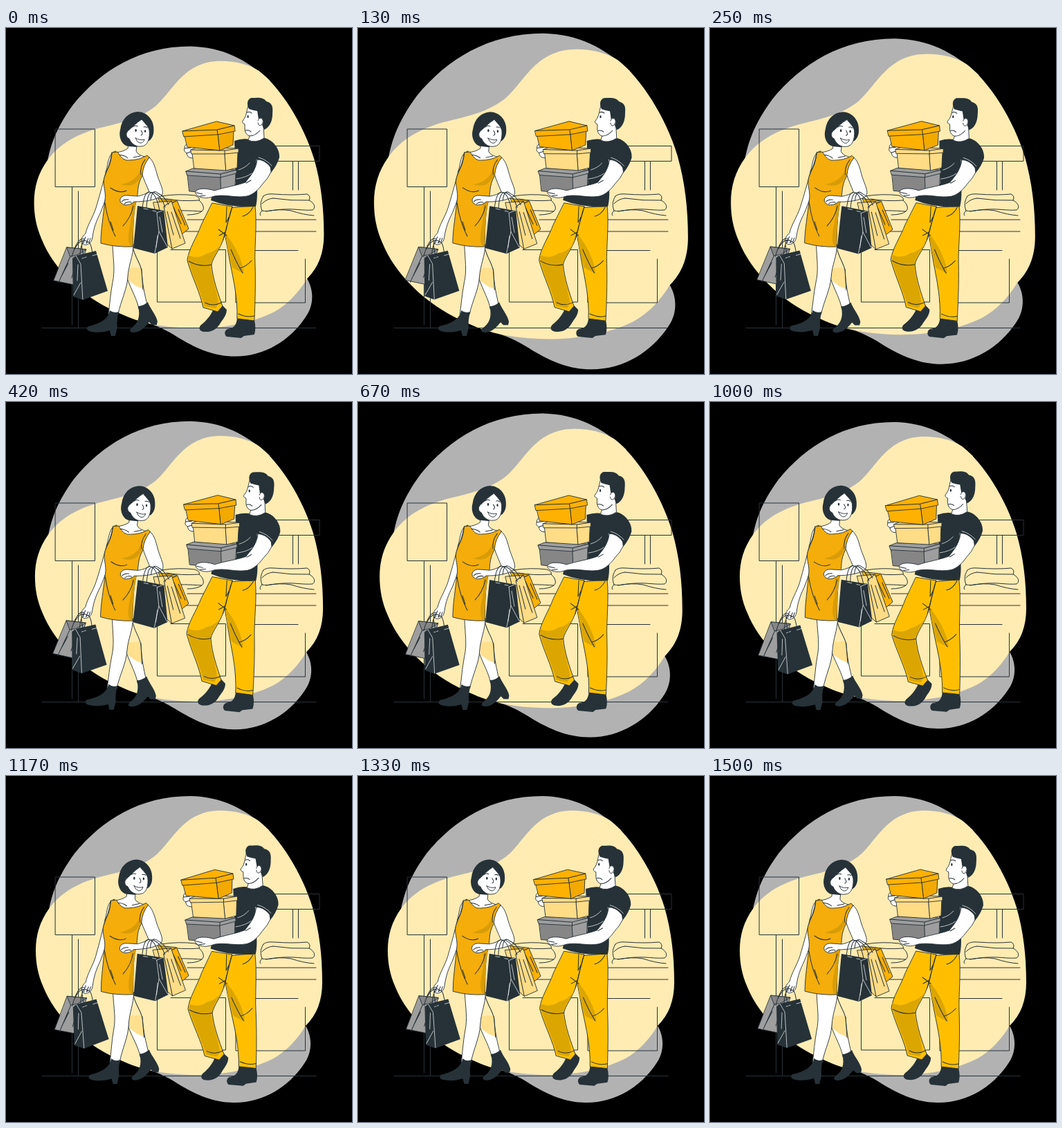
Animation, 500 px wide and 500 px high, one loop 1.54 s. Source, as an HTML page:

```html
<!DOCTYPE html>
<html lang="en">
<head>
<meta charset="utf-8">
<title>Shopping couple</title>
<style>
html, body { margin: 0; width: 100%; height: 100%; overflow: hidden; background: #000; }
svg { display: block; width: 100vw; height: 100vh; }
path { stroke-linejoin: round; stroke-linecap: round; }
.line { fill: none; stroke: #263238; stroke-width: 1; }
.pale { fill: none; stroke: #fff; stroke-width: .7; }
.skin, .dress, .gold, .cream, .grey, .box, .darkgrey, .amber { stroke: #263238; stroke-width: .9; }
.skin { fill: #fff; }
.dress { fill: #f4ad0a; }
.fold { fill: #d99c08; }
.box { fill: #ffb102; }
.gold { fill: #ffbf00; }
.amber { fill: #f2a900; }
.cream { fill: #ffdc86; }
.grey { fill: #9e9e9e; }
.darkgrey { fill: #868686; }
.ink { fill: #263238; }
.shade { fill: #dca600; }
</style>
</head>
<body>
<svg viewBox="0 0 500 500">
  <g id="blob">
    <path fill="#b2b2b2" d="M62 194C66 172 74 146 99 112C139 63 194 29 266 29C312 30 345 47 380 78L433 361C443 378 443 400 430 417C409 448 373 472 330 472C300 472 276 461 252 447C238 438 226 431 205 424Z"/>
    <path fill="#ffecb3" d="M310 50C331 50 350 55 364 64C395 88 428 140 443 190C453 225 457 260 457 298C457 325 449 345 433 361C420 382 405 398 385 409C350 426 310 432 274 432C220 431 190 423 160 408C110 386 70 345 54 305C46 287 43 270 43 252C43 230 49 210 62 192C78 170 100 156 135 146C168 138 195 132 217 114C242 92 257 50 310 50Z"/>
  </g>

  <g class="line">
    <path d="M71.500 146H128.500V229.500H71.500ZM95.500 229.500V429M104.500 236V433M52 433.500H448"/>
    <path d="M380 170.500H453V192.500H380M414.500 192.500V234M422.500 192.500V234"/>
    <path d="M372 243Q376 239 387 240Q415 242 435 240Q441 243 438 249C446 253 448 260 443 263C428 264 418 261 402 262C389 262 379 266 370 264C367 256 368 249 372 243ZM386 246Q412 250 438 249M370 254Q376 247 386 246M370 264Q365 269 368 271M376 265Q395 261 412 264Q430 270 445 271"/>
    <path d="M224 243Q250 239 273 242Q281 245 279 249C286 255 287 262 283 265C266 264 250 263 230 265M232 247Q254 251 279 249M283 265Q277 270 262 270"/>
    <path d="M262 277H448M258 294H448M238 320.500H317.500V396H218.500V320M360 321.500H422M432.500 334V397H332V330"/>
  </g>

  <g id="woman">
    <!-- back leg -->
    <path class="skin" d="M176 350L196 348C197 372 201 386 204 400L192 406C190 393 181 378 176 364Z"/>
    <path fill="#ffecb3" d="M170 316H183C188 333 195 343 196 350H174Z"/>
    <path fill="#ffe08f" d="M176 347L195 346L198 377L188 373L177 365Z"/>
    <path class="line" d="M183 316C187 333 195 341 196 351L198 378"/>
    <path class="ink" d="M191 402Q198 402 205 396C208 405 217 414 219 424L218 429L211 429L207 425C202 431 196 439 185 440C179 440 177 437 182 433C190 427 195 418 191 402Z"/>
    <!-- front leg -->
    <path class="skin" d="M154 313C155 337 158 350 154 368C151 384 150 400 148 414H162C166 394 175 378 176 360C177 342 184 330 184 313Z"/>
    <path class="ink" d="M150 408Q156 413 163 410C161 418 160 425 161 433L158 445H152L150 437C143 439 134 441 124 439C117 438 115 434 119 431C133 428 148 422 150 408Z"/>
    <!-- hanging grey bag -->
    <path class="grey" d="M88 317L116 320L98 371L69 365Z"/>
    <path class="darkgrey" d="M88 317L116 320L103 328L93 330Z"/>
    <path class="line" d="M93 330L76 368M90 340L79 361M104 333L95 361"/>
    <!-- far arm -->
    <path class="skin" d="M158 178C150 180 148 190 146 201C141 221 136 240 130 260C125 275 118 284 115 297Q108 303 109 309Q112 315 117 313Q124 311 125 302C127 288 131 278 136 268C143 251 148 235 150 221Z"/>
    <path class="line" d="M112 309L115 302M116 311L119 304M120 310L122 304M95 331Q103 302 113 305M99 320Q108 302 118 309"/>
    <path class="ink" d="M96 333L101 329L130 322L147 380L111 393L97 388Z"/>
    <path class="pale" d="M101 329L108 341L111 392M98 386L108 368M104 342L103 365M110 333L116 331M125 329L132 327"/>
    <path class="line" d="M113 332Q106 307 113 308M125 326Q122 304 116 311M107 328Q108 311 113 310"/>
    <!-- neck and chest -->
    <path class="skin" d="M178 160L176 174Q169 179 158 180L166 192L188 195L204 187Q190 184 188 178L189 169Z"/>
    <path class="line" d="M162 183Q172 184 176 188M184 187L194 185"/>
    <!-- dress -->
    <path class="dress" d="M153 180L161 179Q169 193 178 191Q192 191 204 184L207 187C201 198 199 204 197 213C188 229 192 239 188 250C183 271 184 294 183 316Q158 317 137 311C137 292 141 270 143 249C145 236 139 227 142 216C147 204 151 193 153 180Z"/>
    <path class="fold" d="M202 191C196 200 195 208 195 214C189 227 180 230 166 226Q186 222 192 209ZM188 251L167 249L180 254C186 276 171 300 180 315H183C184 292 184 270 188 251Z"/>
    <path class="line" d="M153 181Q151 199 144 208M201 190Q193 200 195 212M151 231Q164 240 174 235M143 253Q147 280 158 301M151 280L155 292M184 257Q180 275 169 286"/>
    <!-- bags on forearm -->
    <path class="box" d="M220 246L247 249L264 290L253 299L238 284Z"/>
    <path class="fold" d="M222 247L246 249.500L235 255Z"/>
    <path class="line" d="M235 255L253 298M235 255L246 250M242 259L253 283M249 262L259 285"/>
    <path class="cream" d="M213 252L239 250L259 311L240 319L226 306Z"/>
    <path class="line" d="M228 258L240 319M228 258L239 250M233 265L242 299M239 266L252 304"/>
    <path class="ink" d="M190 257L223 263L228 263L234 317L215 326L184 318Z"/>
    <path class="pale" d="M218 267L228 263M218 267L221 294L215 325M221 294L233 316M222 273L226 295M199 261L205 262M212 264L217 265M219 300L217 317"/>
    <!-- near arm -->
    <path class="skin" d="M207 187C214 193 216 204 219 214C223 226 229 236 225 242C217 249 199 251 185 251C180 256 171 257 168 254Q164 252 165 247Q168 241 176 242L190 243C197 242 203 239 207 237C203 227 199 219 197 212Q198 198 207 187Z"/>
    <path class="line" d="M167 251Q171 247 177 248M171 254Q176 250 181 252M197 261Q200 232 210 238Q218 242 222 264M203 260Q204 234 214 238Q225 243 230 259M209 249Q211 231 220 239Q229 243 235 255"/>
    <!-- head -->
    <path class="ink" d="M178 171C168 171 162 158 165 147C167 131 177 122 190 121C203 121 212 132 213 142C214 151 213 157 208 162L188 172Z"/>
    <path class="skin" d="M178 147C183 143 188 137 196 132C200 137 206 142 207 148C208 159 205 171 195 171C187 172 181 167 178 160Q173 158 174 152Q176 148 178 147Z"/>
    <g class="ink"><ellipse cx="187.500" cy="148" rx="1.300" ry="2"/><ellipse cx="201" cy="149" rx="1.200" ry="1.900"/><circle cx="176" cy="161" r="1.200"/></g>
    <path class="line" d="M183 143Q186 140 190 142M199 143Q202 142 204 144M195 148Q199 154 195 155"/>
    <path class="skin" d="M187 159Q194 163 200 161Q198 167 193 166Q189 165 187 159Z"/>
  </g>

  <g id="man">
    <!-- shoes -->
    <path class="ink" d="M312 400L319 407C319 416 313 421 309 428C304 436 296 440 286 439C279 438 278 433 282 429C290 423 296 415 299 408Z"/>
    <path class="ink" d="M334 420L359 422C361 430 361 437 359 443L344 445L340 448L319 446C315 443 316 437 320 435C328 434 333 431 334 420Z"/>
    <!-- trousers -->
    <path class="gold" d="M318 260L360 257C363 285 359 315 360 340C361 370 360 399 359 423L334 420C335 391 329 365 324 340L316 296Z"/>
    <path class="shade" d="M317 297C330 313 342 334 344 355C336 351 330 348 327 346L320 318Z"/>
    <path class="gold" d="M298 253L327 258C321 274 320 286 316 300C310 320 299 331 297 342C299 363 306 382 313 402L306 410L285 404C281 383 269 361 262 336C263 321 276 302 282 285Z"/>
    <path class="shade" d="M263 328Q276 335 290 326Q301 324 311 313C303 326 297 334 296 344C298 362 305 379 307 398L303 405L287 402C282 382 270 360 264 337Z"/>
    <path class="line" d="M327 258C322 277 318 289 314 306M319 258L318 281L323 272M357 259Q351 270 342 272M297 342Q280 346 264 337M308 300L317 295M307 291L319 300M325 320Q333 339 342 354M338 347Q347 345 355 336M288 397Q299 403 311 397M336 413Q348 419 359 416"/>
    <!-- shirt -->
    <path class="ink" d="M330 163Q342 159 352 161L374 159C386 162 396 175 395 187Q392 198 383 209L365 218C361 229 365 242 361 258Q323 260 296 249L299 235L332 225Z"/>
    <path class="pale" d="M362 190Q364 202 356 211M365 187Q376 187 386 196M336 205Q346 202 352 195M333 218Q347 216 355 210"/>
    <!-- head -->
    <path class="skin" d="M350 112C347 121 348 127 342 134Q340 137 345 139L345 147Q346 154 352 156L350 162Q361 167 373 159L372 143L378 120Z"/>
    <path class="ink" d="M351 117C347 109 349 103 354 101C363 101 371 99 376 106C384 108 386 113 385 123C385 133 382 143 373 147L370 140C373 135 371 130 365 133L363 120Q357 119 351 117Z"/>
    <path class="skin" d="M364 134Q366 128 370 131Q373 135 369 140Q365 143 364 137"/>
    <ellipse class="ink" cx="349.500" cy="128" rx="1.200" ry="2"/>
    <path class="line" d="M348 122Q352 120 355 123M346 148Q351 147 354 150M352 156Q360 156 367 148"/>
    <!-- boxes -->
    <path class="skin" d="M267 165Q257 168 258 174Q256 178 261 181Q262 188 269 188L277 181Z"/>
    <path class="line" d="M258 174L267 173M261 181L269 178"/>
    <path class="darkgrey" d="M262 209L311 211V240L265 236Z"/>
    <path class="grey" d="M310 213L332 208L331 229L311 239Z"/>
    <path class="grey" d="M260 207L270 203L333 205V210L310 216L262 213Z"/>
    <path class="line" d="M260 207L310 211L333 205M310 211V216"/>
    <path class="cream" d="M269 178L316 179L318 206L272 203Z"/>
    <path class="cream" d="M316 180L335 178L334 202L318 206Z"/>
    <path class="cream" d="M267 176L282 170L310 173L336 174V180L316 182L268 182Z"/>
    <path class="line" d="M267 176L316 177L336 174M316 177V182"/>
    <path class="box" d="M258 155L306 150L309 177L262 172Z"/>
    <path class="amber" d="M306 150L329 146L328 169L309 177Z"/>
    <path class="box" d="M255 149L304 135L330 141L331 149L306 154L257 157Z"/>
    <path class="line" d="M255 149L305 147L330 141M305 147L306 154"/>
    <!-- near arm -->
    <path class="skin" d="M363 190C361 207 351 216 346 223C333 228 316 230 301 235C292 232 280 231 275 235Q271 239 278 243C286 247 293 246 301 243C318 240 331 246 348 243C358 241 366 232 371 225Q379 217 383 208L382 199Q372 190 363 190Z"/>
    <path class="ink" d="M362 188Q374 190 384 204L391 190L371 181Z"/>
    <path class="pale" d="M365 187Q376 190 384 199"/>
    <path class="line" d="M275 238L284 240M280 243L288 242M347 224L354 220"/>
  </g>
</svg>
<script>
const LOOP = 1540, LEAD = 17;
const beat = [[0, 1], [.1, 1.1], [.295, 1], [.393, 1], [.488, 1.1], [.582, 1], [1, 1]];
const sway = [[0, 0], [.25, 1], [.75, -1], [1, 0]];
const [blob, woman, man] = ["blob", "woman", "man"].map(id => document.getElementById(id));

// Linear value between keys [phase, value].
function at(keys, u) {
  const i = keys.findIndex(k => k[0] > u);
  const [a, x] = keys[i - 1], [b, y] = keys[i];
  return x + (y - x) * (u - a) / (b - a);
}

function draw(ms) {
  const u = (ms + LEAD) % LOOP / LOOP;
  const angle = at(sway, u);
  blob.setAttribute("transform", `translate(250 250.500) scale(${at(beat, u)}) translate(-250 -250.500)`);
  woman.setAttribute("transform", `rotate(${angle} 167 283)`);
  man.setAttribute("transform", `rotate(${angle} 325 273)`);
}

const start = performance.now();
function tick() {
  draw(performance.now() - start);
  requestAnimationFrame(tick);
}
tick();
</script>
</body>
</html>
```
